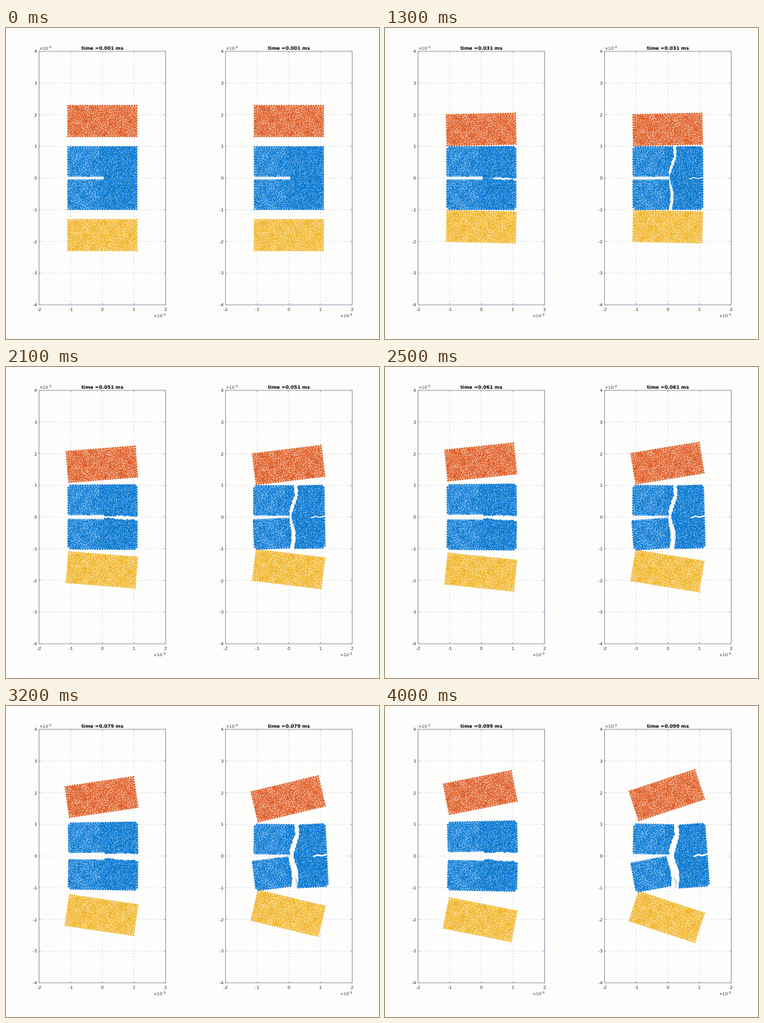
These frames come from a looping animation (480 px wide and 400 px high, 4.1 s). An HTML page:

```html
<!DOCTYPE html>
<html lang="en">
<head>
<meta charset="utf-8">
<title>Impact fracture</title>
<style>
  html, body { margin: 0; width: 100%; height: 100%; overflow: hidden; background: #fdfdfb; }
  svg { display: block; width: 480px; height: 400px; }
  text { font: 5.6px "DejaVu Sans", sans-serif; fill: #333; }
  .title { font-weight: bold; font-size: 6.1px; fill: #000; }
  .power { font-size: 5.2px; }
  .sup { font-size: 4.2px; }
  .axis { fill: none; stroke: #a2a2b6; stroke-width: 1; }
  .grid { stroke: #c6c6ea; stroke-width: 1; stroke-dasharray: 1 3; }
  .dots { fill: none; stroke-linecap: round; stroke-width: 2.1; }
</style>
</head>
<body>
<svg id="stage" viewBox="0 0 480 400"></svg>
<script>
const FRAME = 100, FRAMES = 41, UNIT = 40.75, CY = 193, BREAK = 28;
const PAPER = '#fdfdfb';
const stage = document.getElementById('stage');

function add(parent, tag, attrs, text) {
  const el = document.createElementNS('http://www.w3.org/2000/svg', tag);
  for (const key in attrs) el.setAttribute(key, attrs[key]);
  if (text !== undefined) el.textContent = text;
  parent.appendChild(el);
  return el;
}

function randomizer(seed) {
  return () => {
    seed = (seed * 1664525 + 1013904223) % 4294967296;
    return seed / 4294967296;
  };
}

// Irregular mesh nodes: an even rim, then darts kept apart by gap(x, y)
function scatter(w, h, gap, tries, seed) {
  const rnd = randomizer(seed), pts = [];
  const nx = Math.round(2 * w / 3.2), ny = Math.round(2 * h / 3.2);
  for (let i = 0; i <= nx; i++) {
    const x = -w + 2 * w * i / nx;
    pts.push([x, -h], [x, h]);
  }
  for (let i = 1; i < ny; i++) {
    const y = -h + 2 * h * i / ny;
    pts.push([-w, y], [w, y]);
  }
  for (let n = 0; n < tries; n++) {
    const x = (rnd() * 2 - 1) * w, y = (rnd() * 2 - 1) * h, d = gap(x, y) ** 2;
    if (pts.every(p => (p[0] - x) ** 2 + (p[1] - y) ** 2 > d)) pts.push([x, y]);
  }
  return pts;
}

function inside(poly, [x, y]) {
  let hit = false;
  poly.forEach(([ax, ay], i) => {
    const [bx, by] = poly[(i + 1) % poly.length];
    if ((ay > y) !== (by > y) && x < ax + (bx - ax) * (y - ay) / (by - ay)) hit = !hit;
  });
  return hit;
}

const dotPath = pts => pts.map(p => `M${p[0].toFixed(2)} ${p[1].toFixed(2)}h0`).join('');
const polyPath = pts => 'M' + pts.map(p => p.join(' ')).join('L') + 'Z';
const flip = pts => pts.map(([x, y]) => [x, -y]);
const rev = pts => [...pts].reverse();

const COLORS = {
  red: ['#efa27e', '#d95319', '#df6230'],
  blue: ['#5fabe8', '#0072c4', '#107ae0'],
  gold: ['#f8d582', '#edb120', '#f2b42c']
};

function drawDots(parent, pts, color) {
  const [, dark, light] = COLORS[color];
  add(parent, 'path', { class: 'dots', stroke: light, d: dotPath(pts.filter((p, i) => i % 3 === 0)) });
  add(parent, 'path', { class: 'dots', stroke: dark, d: dotPath(pts.filter((p, i) => i % 3)) });
}

// Rigid motion: dx, dy and counterclockwise degrees at each key time
const KEYS = [1, 24, 31, 51, 99];
function at(values, t) {
  let i = 0;
  while (i < KEYS.length - 2 && t > KEYS[i + 1]) i++;
  const u = (t - KEYS[i]) / (KEYS[i + 1] - KEYS[i]);
  return values[i] + (values[i + 1] - values[i]) * u;
}

const MOVES = {
  plateL: [[0, 0, -.2, -.6, -1.5], [0, 11.8, 10.8, 5.4, -8.5], [0, 0, 1.3, 4.5, 11.2]],
  plateR: [[0, 0, -.2, -.3, -1.4], [0, 11.8, 10.8, 6.4, -5.1], [0, 0, 1.2, 6.9, 18.3]],
  half: [[0, 0, 0, .3, 1.4], [0, 0, -.1, -1, -4.1], [0, 0, .2, .5, 1.2]],
  upper: [[0, 0, -.4, -.8, .2], [0, 0, 0, 0, -.5], [0, 0, .1, -.2, -1.2]],
  lower: [[0, 0, -.4, -.6, -.2], [0, 0, .1, .2, 2.2], [0, 0, .3, 2.5, 10.5]],
  front: [[0, 0, .5, 1.5, 6.2], [0, 0, 0, -.2, -.6], [0, 0, .2, 1, 4.2]]
};

const patch = (x, y) => .4 * Math.sin(x * .27 + 1) * Math.sin(y * .23 + x * .05);
const plateDots = scatter(44.3, 19.8, (x, y) => 2.05 + patch(x, y), 11000, 7);
const coreDots = scatter(44.3, 40.2, (x, y) => x < -4 ? 2.1 + patch(x, y) : 1.7, 18000, 21)
  .filter(([x, y]) => !(x < 2 && Math.abs(y) < 2.3));

const side = [[44.5, 38], [42.5, 40.4]];
const corner = [[-42.5, 40.4], [-44.5, 38]];
const topLip = [[1, -1.6], [-44.5, -1.6]], lowLip = flip(rev(topLip));

// Both faces of each crack, from the notch tip outwards
const acrossTop = [[2, 0], [10, 0], [18, -.5], [30, -.3], [44.5, .5]];
const acrossLow = [[2, 0], [10, .3], [18, 1.6], [30, 2.6], [36, 1.6], [44.5, 3.2]];
const upLeft = [[2, 0], [1, -7], [5, -20], [8, -28], [7, -40.4]];
const upRight = [[2, 0], [4, -8], [8, -20], [11, -28], [10.5, -40.4]];
const downLeft = [[2, 0], [2, 9], [4, 20], [3.5, 30], [1.5, 40.4]];
const downRight = [[2, 0], [4, 9], [7, 20], [6.5, 30], [4.5, 40.4]];

const CORE_L = [
  { poly: [...topLip, ...rev(flip(corner)), ...rev(flip(side)), ...rev(acrossTop)], move: 'half', c: [0, -20] },
  { poly: [...lowLip, ...acrossLow, ...side, ...corner], move: 'half', c: [0, 20], mirror: true }
];
const CORE_R = [
  { poly: [...topLip, ...rev(flip(corner)), ...rev(upLeft)], move: 'upper', c: [-21, -21] },
  { poly: [...lowLip, ...downLeft, ...corner], move: 'lower', c: [-21, 21] },
  { poly: [...rev(upRight), ...downRight, ...rev(side), ...flip(side)], move: 'front', c: [26, 0] }
];

const bodies = [], panels = [];

function addPiece(parent, piece, pts, color) {
  const g = add(parent, 'g', {}), base = COLORS[color][0];
  add(g, 'path', { d: polyPath(piece.poly), fill: base });
  drawDots(g, pts, color);
  bodies.push({ g, c: piece.c, move: MOVES[piece.move], sign: piece.mirror ? -1 : 1 });
  return g;
}

function addPlate(parent, color, move, mirror) {
  const y0 = mirror ? 73.35 : -73.35;
  const shift = pts => pts.map(([x, y]) => [x, y + y0]);
  const poly = shift([[-44.4, -20], [44.4, -20], [44.4, 20], [-44.4, 20]]);
  addPiece(parent, { poly, move, c: [0, y0], mirror }, shift(mirror ? flip(plateDots) : plateDots), color);
}

function addAxes(cx) {
  const w = 2 * UNIT, h = 4 * UNIT, top = CY - h, low = CY + h, left = cx - w, right = cx + w;
  let grid = '', ticks = '';
  for (let i = -2; i <= 2; i++) {
    const x = cx + i * UNIT;
    if (Math.abs(i) < 2) grid += `M${x} ${top}V${low}`;
    ticks += `M${x} ${top}v2M${x} ${low}v-2`;
    add(stage, 'text', { x, y: 364, 'text-anchor': 'middle' }, i);
  }
  for (let i = -4; i <= 4; i++) {
    const y = CY - i * UNIT;
    if (Math.abs(i) < 4) grid += `M${left} ${y}H${right}`;
    ticks += `M${left} ${y}h2M${right} ${y}h-2`;
    add(stage, 'text', { x: left - 2.5, y: y + 2, 'text-anchor': 'end' }, i);
  }
  add(stage, 'path', { class: 'grid', d: grid });
  add(stage, 'path', { class: 'axis', d: ticks + `M${left} ${top}H${right}V${low}H${left}Z` });
  for (const [x, y] of [[left + .5, 28.2], [right - 15.5, 372.2]]) {
    add(stage, 'text', { class: 'power', x, y }, '×10');
    add(stage, 'text', { class: 'sup', x: x + 11.2, y: y - 1.8 }, '-3');
  }
}

function addPanel(cx, plate, core) {
  addAxes(cx);
  const title = add(stage, 'text', { class: 'title', x: cx, y: 28, 'text-anchor': 'middle' });
  const g = add(stage, 'g', { transform: `translate(${cx} ${CY})` });
  addPlate(g, 'red', plate, false);
  addPlate(g, 'gold', plate, true);
  // Material in the crack paths, present only until the break
  const loose = add(g, 'g', {});
  add(loose, 'rect', { x: 2, y: -40, width: 42.4, height: 80, fill: COLORS.blue[0] });
  const parts = core.map(c => addPiece(g, c, coreDots.filter(p => inside(c.poly, p)), 'blue'));
  drawDots(loose, coreDots.filter(p => !core.some(c => inside(c.poly, p))), 'blue');
  panels.push({ title, loose });
  return { g, parts };
}

addPanel(124, 'plateL', CORE_L);
const right = addPanel(364, 'plateR', CORE_R);
const split = add(right.parts[2], 'path', {
  d: 'M27 1.5L33 -.8L38 .8L46 -1', fill: 'none', stroke: PAPER, 'stroke-linejoin': 'round'
});
const shred = add(right.g, 'path', {
  d: 'M8 26q3 7 2 15M9 30l4 7', fill: 'none', stroke: '#4a9fe6', 'stroke-width': .5
});

const show = (el, on) => el.setAttribute('visibility', on ? 'visible' : 'hidden');

function draw(ms) {
  const k = Math.floor(ms / FRAME) % FRAMES;
  const t = 1 + 2.5 * Math.max(0, k - 1);
  const label = `time =${(Math.round(t) / 1000).toFixed(3)} ms`;
  for (const { title, loose } of panels) {
    title.textContent = label;
    show(loose, t < BREAK);
  }
  for (const { g, c, move, sign } of bodies) {
    const [dx, dy, turn] = move.map(v => at(v, t));
    g.setAttribute('transform',
      `translate(${dx} ${dy * sign}) rotate(${-turn * sign} ${c[0]} ${c[1]})`);
  }
  show(split, t > BREAK);
  split.setAttribute('stroke-width', Math.min(2.2, 1 + (t - BREAK) / 50));
  show(shred, t > 60);
}

const start = performance.now();
function tick() {
  draw(performance.now() - start);
  requestAnimationFrame(tick);
}
draw(0);
requestAnimationFrame(tick);
</script>
</body>
</html>
```
